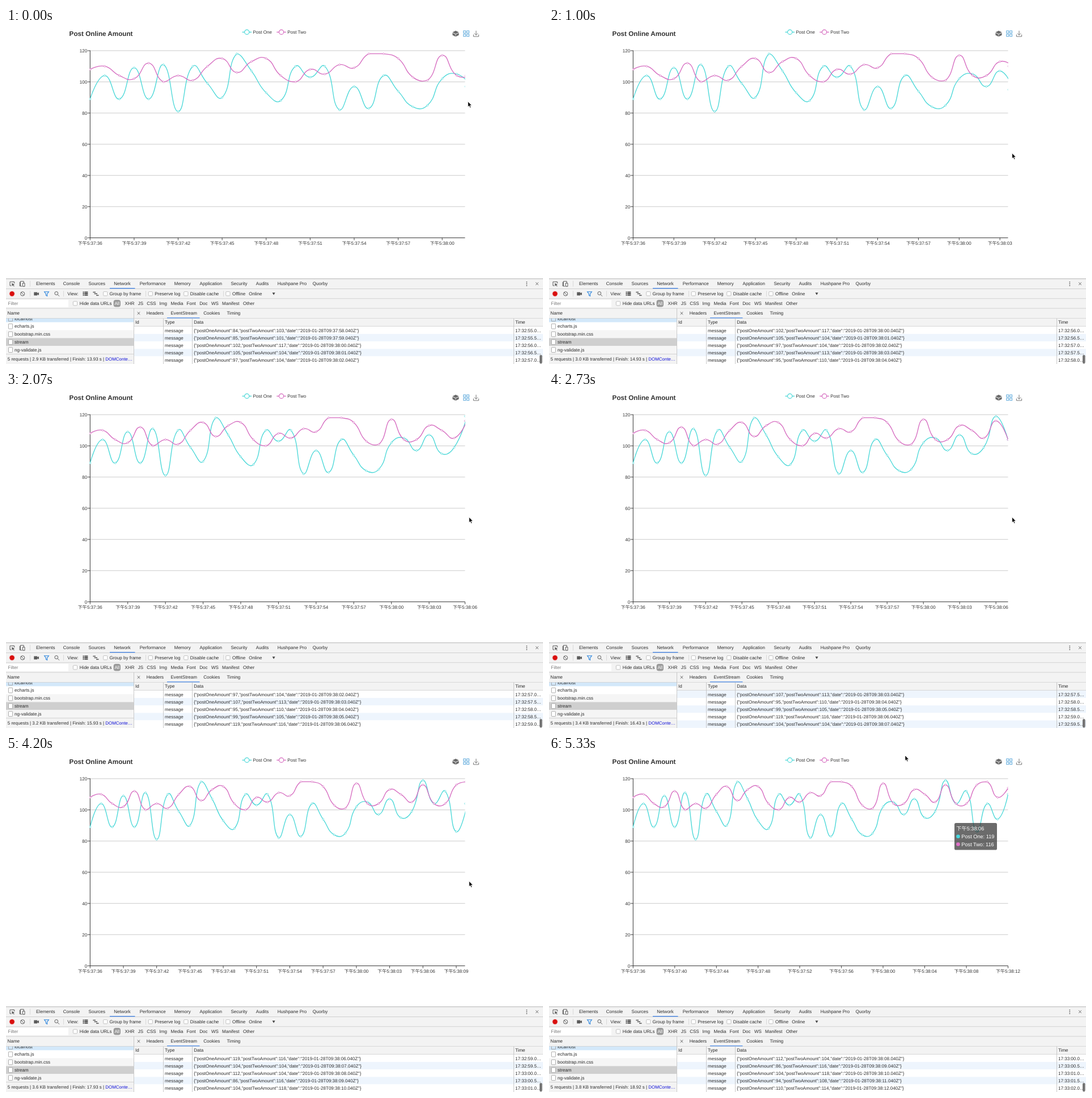
Animation, 947 px wide and 592 px high, one loop 5.39 s. Source, as an HTML page:

```html
<!DOCTYPE html>
<html lang="en">
<head>
<meta charset="utf-8">
<title>Post Online Amount</title>
<style>
html, body { margin: 0; width: 100%; height: 100%; overflow: hidden; background: #fff; }
svg { display: block; width: 947px; height: 592px; }
text {
  font: 8.05px "Liberation Sans", "Noto Sans CJK SC", "Noto Sans CJK JP", Arial, sans-serif;
  fill: #2c2c2c; text-rendering: geometricPrecision; white-space: pre;
}
.title { font-size: 11.7px; font-weight: bold; fill: #333; }
.axis { fill: #333; }
.tip { font-size: 9.2px; fill: #fff; }
.foot { font-size: 7.95px; }
.icon { fill: none; stroke: #5a5a5a; stroke-width: 1; }
</style>
</head>
<body>
<svg viewBox="0 0 947 592">
  <defs><clipPath id="plot"><rect x="147" y="30" width="662.8" height="342"/></clipPath></defs>
  <g id="page"></g>
  <g id="chart"></g>
  <g id="panel"></g>
  <g id="live"></g>
  <g id="tooltip">
    <rect x="715" y="118" width="75" height="47.6" rx="2.7" fill="#323232" fill-opacity=".72"/>
    <text class="tip" x="718.3" y="131.3">下午5:38:06</text>
    <circle cx="721.5" cy="141.7" r="3.3" fill="#45d8df"/><text class="tip" x="727.3" y="145">Post One: 119</text>
    <circle cx="721.5" cy="155.5" r="3.3" fill="#e070c8"/><text class="tip" x="727.3" y="158.8">Post Two: 116</text>
  </g>
  <path id="cursor" d="M0 0V9.4L2.1 7.5L3.6 11L5.2 10.3L3.7 6.9H6.6Z" fill="#000" stroke="#fff" stroke-width=".7"/>
</svg>
<script>
const LOOP = 5390, X0 = 148.3, WIDTH = 661.2, FIRST = 26;
const CYAN = '#4bd8d8', PINK = '#d66cc0';
const one = [89, 104, 89, 109, 89, 111, 81, 110, 99, 90, 118, 107, 93, 88, 110, 103, 110, 82, 97, 83, 104, 94, 84,
  85, 102, 105, 97, 107, 95, 99, 119, 104, 112, 86, 104, 94, 110];
const two = [108, 110, 104, 102, 112, 100, 104, 101, 110, 115, 106, 113, 115, 104, 100, 108, 105, 111, 109, 118, 118,
  115, 103, 101, 117, 104, 104, 113, 110, 105, 116, 104, 104, 116, 118, 108, 114];
// arrival time of each message, starting with number FIRST
const arrivals = [-73, 429, 920, 1411, 1920, 2425, 2950, 3475, 4076, 4530, 5010];
const sizes = [2.9, 2.9, 3, 3.1, 3.2, 3.4, 3.5, 3.6, 3.6, 3.7, 3.8];

const $ = id => document.getElementById(id);
const text = (x, y, s, attr = '') => `<text x="${x}" y="${y}" ${attr}>${s}</text>`;
const rect = (x, y, w, h, fill, attr = '') => `<rect x="${x}" y="${y}" width="${w}" height="${h}" fill="${fill}" ${attr}/>`;
const path = (d, attr = 'class="icon"') => `<path d="${d}" ${attr}/>`;
const line = (d, stroke, w = 1) => path(d, `fill="none" stroke="${stroke}" stroke-width="${w}"`);
const ring = (x, y, r, stroke, w, attr = '') =>
  `<circle cx="${x}" cy="${y}" r="${r}" fill="#fff" stroke="${stroke}" stroke-width="${w}" ${attr}/>`;
const pad = v => String(v).padStart(2, '0');
const clamp = v => Math.min(1, Math.max(0, v));
const mix = (a, b, p) => a + (b - a) * p;
const easeOut = p => 1 - (1 - p) ** 3;
const yOf = v => 369.7 - v * 2.748;
const clock = i => `${37 + Math.floor((36 + i) / 60)}:${pad((36 + i) % 60)}`;

function drawPage() {
  let s = text(111.6, 13.6, 'Post Online Amount', 'class="title"');
  [[416.5, CYAN, 'Post One'], [477.3, PINK, 'Post Two']].forEach(([x, c, name]) => {
    s += line(`M${x} 7.3h16.6`, c, 1.3) + ring(x + 8.3, 7.3, 4.1, c, 1.2) + text(x + 19, 10.2, name, 'class="axis"');
  });
  s += path('M787.4 7.6L793 4.8L798.6 7.6L793 10.4ZM787.4 8.6L792.7 11.3V15.2L787.4 12.5ZM798.6 8.6L793.3 11.3V15.2L798.6 12.5Z', 'fill="#6a6a6a"');
  for (const x of [806.8, 812.7]) for (const y of [5, 10.9])
    s += rect(x, y, 3.9, 3.9, 'none', 'stroke="#4a9fd8" stroke-width=".9"');
  s += line('M829 4.8V12.4M825.8 9.3L829 12.5L832.2 9.3M824.4 11.5V15H833.6V11.5', '#666', .9);
  for (let v = 0; v <= 120; v += 20) {
    const y = yOf(v);
    if (v) s += line(`M${X0} ${y}H809.5`, '#c6c6c6', .9);
    s += line(`M143.8 ${y}H${X0}`, '#333', .9) + text(143.2, y + 2.9, v, 'text-anchor="end" class="axis"');
  }
  s += line(`M${X0} 39.6V370.2M${X0} 369.7H809.5`, '#333', 1);
  $('page').innerHTML = s;
}

function drawPanel() {
  const rule = (y, x = 0, w = 947) => rect(x, y, w, .8, '#c9c9c9');
  const box = (x, y) => rect(x - 3.6, y - 3.6, 7.2, 7.2, '#fff', 'rx="1.2" stroke="#b4b4b4" stroke-width=".8"');
  const labels = (y, list) => list.map(([x, t]) => text(x, y, t)).join('');
  const sep = (x, y) => rect(x, y - 5, .7, 10, '#ccc');
  const cross = (x, y) => line(`M${x - 2.3} ${y - 2.3}l4.6 4.6m0 -4.6l-4.6 4.6`, '#555', .9);

  let s = rect(0, 441.6, 947, 70.4, '#f3f3f3') + rect(0, 441.4, 947, .9, '#adadad');
  s += [459, 476.4, 493.6, 511].map(y => rule(y)).join('');

  // tab bar
  s += path('M13 447.2H7V454H9.6M14.8 450V447.2H12') + path('M10 449.4L15.3 452L13 452.7L14.8 455L14 455.6L12.2 453.3L11 455Z', 'fill="#5a5a5a"');
  s += path('M25.5 446.3H31.3V449M25.5 446.3V455H28.2M24.2 447.5V455M29.3 449.5H33V455.3H29.3Z') + sep(42, 450.5);
  s += labels(453.3, [[53, 'Elements'], [100.8, 'Console'], [145.6, 'Sources'], [190.3, 'Network'], [235.7, 'Performance'],
    [296.7, 'Memory'], [341.6, 'Application'], [396.4, 'Security'], [440.8, 'Audits'], [478.8, 'Hushpane Pro'], [540.8, 'Quorby']]);
  s += rect(183, 458, 44.5, 1.3, '#4285e8');
  for (const y of [447.6, 450.7, 453.8]) s += `<circle cx="918.3" cy="${y}" r=".9" fill="#555"/>`;
  s += cross(936.5, 450.6);

  // network toolbar
  s += '<circle cx="10.6" cy="468.2" r="5.2" fill="#f3cccc"/><circle cx="10.6" cy="468.2" r="4.2" fill="#d9100f"/>';
  s += '<circle cx="29.2" cy="468.3" r="3.6" class="icon"/>' + path('M26.7 465.8L31.7 470.8') + sep(42, 468.2);
  s += path('M49.3 465.4H55.3V467.4L58 465.7V470.9L55.3 469.2V471.2H49.3Z', 'fill="#5a5a5a"');
  s += line('M67.6 464.8H75.4L72.6 468.4V472.2L70.4 471V468.4Z', '#2a84dd', 1.1);
  s += '<circle cx="88.8" cy="467.4" r="2.9" class="icon"/>' + path('M91 469.6L94 472.6') + sep(101, 468.2);
  for (const y of [465.4, 468, 470.6]) s += rect(135.6, y - .9, 1.9, 1.9, '#444') + rect(138.4, y - .9, 6, 1.9, '#444');
  s += line('M153.4 465.5H158M155.6 468.2H161M159 471H163.5', '#555', 1.4);
  s += [175.2, 254.8, 317.3, 391.4].map(x => box(x, 468.2)).join('') + sep(246, 468.2) + sep(383, 468.2);
  s += labels(471, [[108.2, 'View:'], [182.4, 'Group by frame'], [262.2, 'Preserve log'], [324.8, 'Disable cache'],
    [399, 'Offline'], [428.2, 'Online']]);
  s += path('M469.6 466.3H474.6L472.1 470.6Z', 'fill="#444"');

  // filter row
  s += rect(0, 479, 110, 13, '#fff') + text(3.6, 488.4, 'Filter', 'style="fill:#7b7b7b"') + box(122, 485.3);
  s += rect(189.6, 479, 12.4, 12.6, '#9a9a9a', 'rx="4"') + text(191.4, 488.2, 'All', 'style="fill:#fff"');
  s += labels(488.2, [[129.8, 'Hide data URLs'], [209.6, 'XHR'], [232.8, 'JS'], [248.2, 'CSS'], [270.6, 'Img'], [290.6, 'Media'],
    [318.6, 'Font'], [341.3, 'Doc'], [362, 'WS'], [381, 'Manifest'], [418, 'Other']]);

  // panes
  s += labels(505.4, [[2.6, 'Name'], [247.7, 'Headers'], [290.5, 'EventStream'], [348.2, 'Cookies'], [389.5, 'Timing']]);
  s += cross(234, 502.6) + rect(284, 510.2, 57.5, 1.3, '#4285e8');
  s += rect(0, 511.8, 225, 6.8, '#d3e8fa');
  s += `<svg x="0" y="511.8" width="225" height="8" viewBox="0 511.8 225 8">${text(15, 514.6, 'localhost')}${line('M4.4 509V516.6H11.6V509', '#999', .8)}</svg>`;
  ['echarts.js', 'bootstrap.min.css', 'stream', 'ng-validate.js'].forEach((name, i) => {
    const y = 518.6 + i * 13.85;
    s += rect(0, y, 225, 13.85, ['#fff', '#f5f5f5', '#cfcfcf', '#f5f5f5'][i]);
    s += rect(4.4, y + 2.6, 7.2, 8.8, '#fff', 'rx=".8" stroke="#999" stroke-width=".8"') + text(15, y + 9.8, name);
  });
  s += rect(0, 574.6, 225, 17.4, '#f3f3f3') + rule(574.2, 0, 225);
  s += rect(225.4, 511.8, 722, 13.6, '#f3f3f3') + rule(525, 225.4, 722);
  s += labels(521.3, [[228, 'Id'], [280, 'Type'], [331.2, 'Data'], [898, 'Time']]);
  $('panel').innerHTML = s;
}

// smooth curve whose handles stay within the bounds of the data
function curve(pts) {
  const ys = pts.map(p => p[1]), lo = Math.min(...ys), hi = Math.max(...ys), right = pts[pts.length - 1][0];
  const fit = (x, y) => [Math.min(right, Math.max(X0, x)), Math.min(hi, Math.max(lo, y))].map(v => v.toFixed(2));
  let d = `M${pts[0]}`, out = pts[0];
  for (let i = 1; i < pts.length; i++) {
    const [x, y] = pts[i], prev = pts[i - 1], next = pts[i + 1];
    let into = [x, y], after = into;
    if (next) {
      const a = Math.hypot(x - prev[0], y - prev[1]), b = Math.hypot(next[0] - x, next[1] - y), r = b / (a + b);
      const vx = (next[0] - prev[0]) / 2, vy = (next[1] - prev[1]) / 2;
      into = [x - vx * (1 - r), y - vy * (1 - r)];
      after = [x + vx * r, y + vy * r];
    }
    d += `C${fit(...out)} ${fit(...into)} ${x} ${y}`;
    out = after;
  }
  return d;
}

function drawChart(n, p) {
  const end = WIDTH / n, step = mix(WIDTH / (n - 1), end, p);
  const every = m => m < 36 ? 3 : 4;
  let s = '';
  for (let i = 0; i <= n; i += every(n)) {
    const known = i < n && i % every(n - 1) === 0;
    const x = X0 + i * (known ? step : end);
    s += line(`M${x} 369.7v4.2`, '#333', .9) + text(x, 382.2, '下午5:' + clock(i), 'text-anchor="middle" class="axis"');
  }
  s += '<g clip-path="url(#plot)">';
  [[one, CYAN], [two, PINK]].forEach(([data, c]) => {
    const pts = data.slice(0, n + 1).map((v, i) => [X0 + i * step, yOf(v)]);
    s += line(curve(pts), c, 1.35);
    pts.forEach(([x, y], i) => {
      s += i < n ? ring(x, y, 1.5, c, .7) : ring(X0 + WIDTH, y, 1.5 * p, c, .7, `opacity="${p}"`);
    });
  });
  $('chart').innerHTML = s + '</g>';
}

function drawMessages(n) {
  let s = '';
  for (let j = 0; j < 5; j++) {
    const i = n - 4 + j, y = 525.9 + j * 13.17, secs = 55 + (i - 22) / 2;
    s += rect(225.8, y, 721.2, 13.17, i % 2 ? '#eef5fd' : '#fff');
    s += text(280, y + 9.9, 'message');
    s += text(331.2, y + 9.9, `{"postOneAmount":${one[i]},"postTwoAmount":${two[i]},"date":"2019-01-28T09:${clock(i)}.040Z"}`);
    s += text(898, y + 9.9, `17:${32 + Math.floor(secs / 60)}:${(secs % 60).toFixed(1).padStart(4, '0')}…`);
  }
  for (const x of [277, 328.2, 895.2]) s += rect(x, 511.8, .8, 80.2, '#bdbdbd');
  s += rect(225, 494, .8, 98, '#bdbdbd') + rect(941, 576, 4.6, 15.4, '#747474', 'rx="2.3"');
  const k = n - FIRST;
  s += text(2.8, 586.1, `5 requests | ${sizes[k].toFixed(1)} KB transferred | Finish: ${(13.93 + .4994 * k).toFixed(2)} s | ` +
    '<tspan fill="#1414d8">DOMConte…</tspan>', 'class="foot"');
  $('live').innerHTML = s;
}

function cursorAt(t) {
  if (t < 5130) {
    const p = easeOut(clamp(t / 330));
    return [mix(814.7, 816.7, p), mix(129.6, 220.6, p)];
  }
  const p = clamp((t - 5130) / 200), q = 1 - p;
  return [q * q * 816.7 + 2 * p * q * 690 + p * p * 628, q * q * 220.6 + 2 * p * q * 98 - p * p];
}

let shownTick = -1, shownCount = 0;
function render() {
  const now = performance.now() % LOOP, r = now % 200;
  // fifteen pictures a second
  const tick = Math.floor(now / 200) * 3 + (r < 70 ? 0 : r < 130 ? 1 : 2);
  if (tick !== shownTick) {
    shownTick = tick;
    const t = tick * 200 / 3, k = arrivals.filter(a => a <= t).length - 1, n = FIRST + k;
    drawChart(n, easeOut(clamp((t - arrivals[k]) / 300)));
    if (n !== shownCount) drawMessages(shownCount = n);
    $('tooltip').style.display = t >= 5199 ? '' : 'none';
    $('cursor').setAttribute('transform', `translate(${cursorAt(t)})`);
  }
  requestAnimationFrame(render);
}

drawPage();
drawPanel();
render();
</script>
</body>
</html>
```
